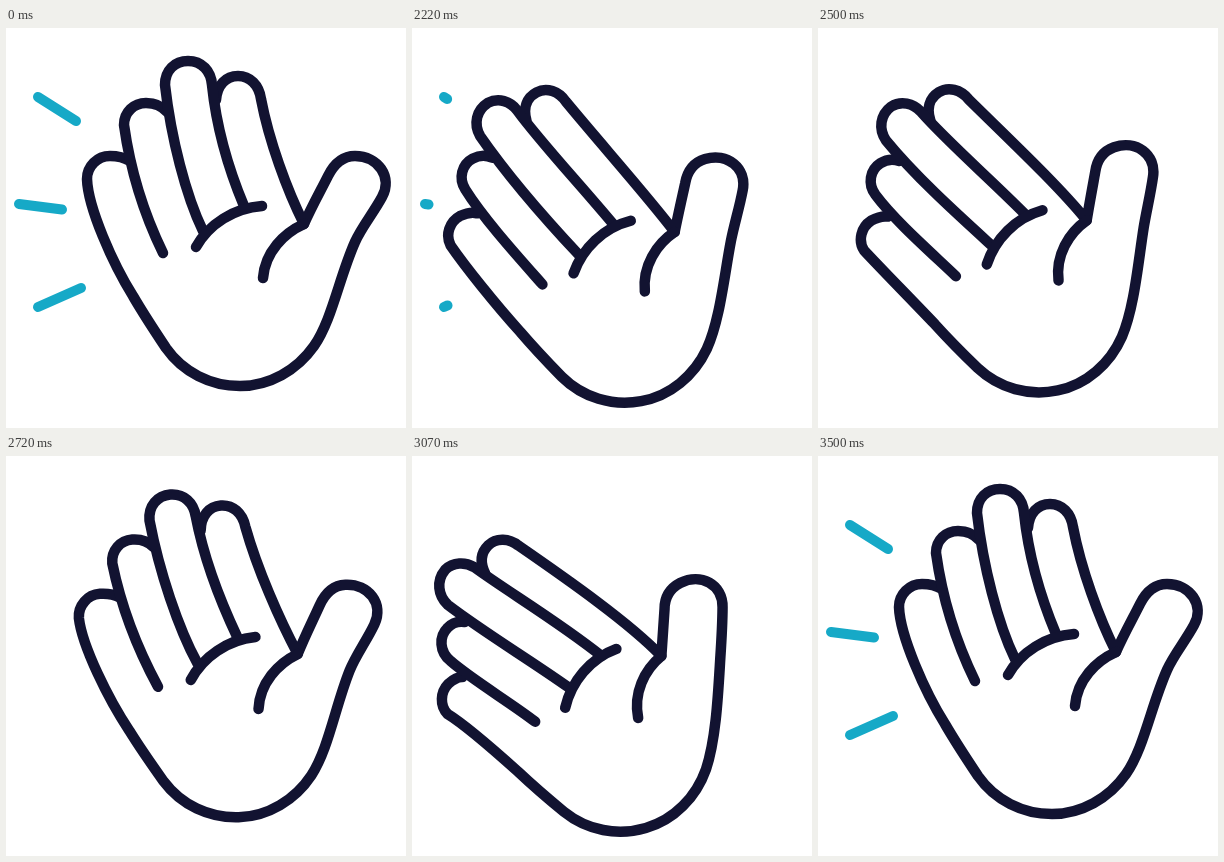
An HTML page that plays this animation: 400 px wide and 400 px high, repeating every 3.52 s.

```html
<!DOCTYPE html>
<html lang="en">
<head>
<meta charset="utf-8">
<title>Waving hand</title>
<style>
  html, body { margin: 0; width: 100%; height: 100%; overflow: hidden; background: #fff; }
  svg { display: block; width: 100vw; height: 100vh; }
  path, line { fill: none; stroke-linecap: round; stroke-linejoin: round; }
  path { stroke: #121331; stroke-width: 10.5; }
  line { stroke: #16a9c7; stroke-width: 10; }
</style>
</head>
<body>
<svg id="stage" viewBox="0 0 400 400" xmlns="http://www.w3.org/2000/svg"></svg>
<script>
const LOOP = 3520;
const svg = document.getElementById('stage');

// Each stroke as a Bezier chain: upright pose, then leaning pose.
const strokes = [
  // silhouette: little finger, palm, thumb, index finger
  [`124 133 119 130 112 128 104 128 91.3 128 81 138.3 81 151
    82 180 107 236 127 268 138 287 150 305 160 320
    177 344.2 204.6 358 234 358 263.4 358 291 342.2 308 318
    326 292 333 250 349 214 355 200 368 184 376 169
    387 149 372 128 349 128 337 128 328 136 322 148
    315 162 305 180 298 196 281 162 263 113 255 71
    253 57 244 48 232 48 220 48 211 57 210 72`,
   `49 228 45 228 39.5 231 35 235 27 243.3 26.5 257 34.5 265
    52 275 76 295 104 320 120 335 136.6 349 150 360
    173.4 378.7 203.8 384.4 232 376 260.2 368 282.2 345 292 317
    302 287 304 241 306 206 307 190 308 172 308 155
    308.3 132 286 120.5 265.5 131 255 136.6 250 145 250 157
    249 172 248 190 247 204 215 171 155 130 104 96
    95 89 82 88 74 96 66 104 66 114 71 124`],
  // ring finger
  [`157 225 138 186 124 140 118 97 118 84 128 75 140 75 149 75 156 78 161 84`,
   `121 270 97 252 58 230 37 212 26 203 25 188 34 179 38 174.5 44 172 51 173`],
  // middle finger
  [`197 203 180 168 165 110 159 57 159 42 169 33 182 33
    196 33 205 43 206 57 210 95 220 135 238 178`,
   `155 236 116 209 70 183 34 156 24 147 22 132 31 121
    39 113 51 113 60 118 92 141 146 172 187 204`],
  // palm creases
  [`190 219 203 196 228 180 256 178`, `151 256 157 230 175.7 206.7 202 197`],
  [`298 196 278 205 259 224 257 250`, `247 204 230 218 219 241 224 266`]
];

// time, lean, shift x, shift y, finger stretch, finger lag
const keys = [
  [2000, 0, 0, 0, 0, 0],
  [2220, .62, -3.8, 3.4, 8.7, 2.5],
  [2345, 1.12, 0, -1, 0, 0],
  [2500, .72, 7, -9, 3.7, -1.7],
  [2680, .03, 0, 0, 0, 0],
  [2845, .68, -3.6, 3.2, 7, 2],
  [2920, 1, 0, 0, 0, 0],
  [3000, 1.12, 0, -1, 0, 0],
  [3200, .54, 6.3, -8, 7.2, 3.4],
  [3490, 0, 0, 0, 0, 0]
];

// outer end, inner end
const rays = [[32, 69, 70, 93], [13, 176, 56, 181.5], [32, 279, 75, 260]];

const LEAN = 27 * Math.PI / 180;
const HUB = [215, 240], HUB_LEANT = [181, 268];
const ALONG = [-.42, -.91], ACROSS = [.91, -.42];

const clamp = v => Math.max(0, Math.min(1, v));
const mix = (a, b, k) => a + (b - a) * k;
const turn = ([x, y], a) => {
  const c = Math.cos(a), s = Math.sin(a);
  return [x * c - y * s, x * s + y * c];
};

function points(text) {
  const n = text.trim().split(/\s+/).map(Number);
  return Array.from({ length: n.length / 2 }, (_, i) => [n[2 * i], n[2 * i + 1]]);
}

function add(tag) {
  return svg.appendChild(document.createElementNS('http://www.w3.org/2000/svg', tag));
}

// Points relative to the hub, both poses in the upright frame.
const parts = strokes.map(([up, leant]) => {
  const end = points(leant);
  return {
    el: add('path'),
    pts: points(up).map(([x, y], i) => {
      const a = [x - HUB[0], y - HUB[1]];
      const b = turn([end[i][0] - HUB_LEANT[0], end[i][1] - HUB_LEANT[1]], LEAN);
      const reach = a[0] * ALONG[0] + a[1] * ALONG[1];
      return { a, b, w: clamp((reach - 50) / 90) };
    })
  };
});
const rayEls = rays.map(() => add('line'));

// Smooth through the keys, flat at turning points.
function slope(i, c) {
  if (i === 0 || i === keys.length - 1) return 0;
  const [p, q, r] = [keys[i - 1], keys[i], keys[i + 1]];
  if ((q[c] - p[c]) * (r[c] - q[c]) <= 0) return 0;
  return (r[c] - p[c]) / (r[0] - p[0]);
}

function pose(t) {
  const last = keys.length - 1;
  if (t <= keys[0][0]) return keys[0].slice(1);
  if (t >= keys[last][0]) return keys[last].slice(1);
  const i = keys.findIndex(k => k[0] > t) - 1;
  const p = keys[i], q = keys[i + 1], d = q[0] - p[0], s = (t - p[0]) / d;
  const s2 = s * s, s3 = s2 * s, h = 3 * s2 - 2 * s3;
  return [1, 2, 3, 4, 5].map(c =>
    mix(p[c], q[c], h) + d * ((s3 - 2 * s2 + s) * slope(i, c) + (s3 - s2) * slope(i + 1, c)));
}

function drawHand(t) {
  const [k, ox, oy, stretch, lag] = pose(t);
  const cx = mix(HUB[0], HUB_LEANT[0], k) + ox;
  const cy = mix(HUB[1], HUB_LEANT[1], k) + oy;
  const dx = stretch * ALONG[0] + lag * ACROSS[0];
  const dy = stretch * ALONG[1] + lag * ACROSS[1];
  for (const { el, pts } of parts) {
    const out = pts.map(({ a, b, w }) => {
      const [x, y] = turn([mix(a[0], b[0], k) + w * dx, mix(a[1], b[1], k) + w * dy], -LEAN * k);
      return (cx + x).toFixed(2) + ' ' + (cy + y).toFixed(2);
    });
    el.setAttribute('d', 'M' + out[0] + 'C' + out.slice(1).join(' '));
  }
}

// Rays shrink towards the outer end, then grow from the inner end.
function drawRays(t) {
  const from = t < 2700 ? 0 : 1 - clamp((t - 3150) / 230);
  const to = t < 2700 ? 1 - clamp((t - 2010) / 230) : 1;
  rays.forEach(([x1, y1, x2, y2], i) => {
    const el = rayEls[i];
    el.setAttribute('x1', mix(x1, x2, from));
    el.setAttribute('y1', mix(y1, y2, from));
    el.setAttribute('x2', mix(x1, x2, to));
    el.setAttribute('y2', mix(y1, y2, to));
    el.setAttribute('visibility', to > from ? 'visible' : 'hidden');
  });
}

function draw(now) {
  const t = now % LOOP;
  drawHand(t);
  drawRays(t);
}

function tick(now) {
  draw(now);
  requestAnimationFrame(tick);
}

draw(0);
requestAnimationFrame(tick);
</script>
</body>
</html>
```
